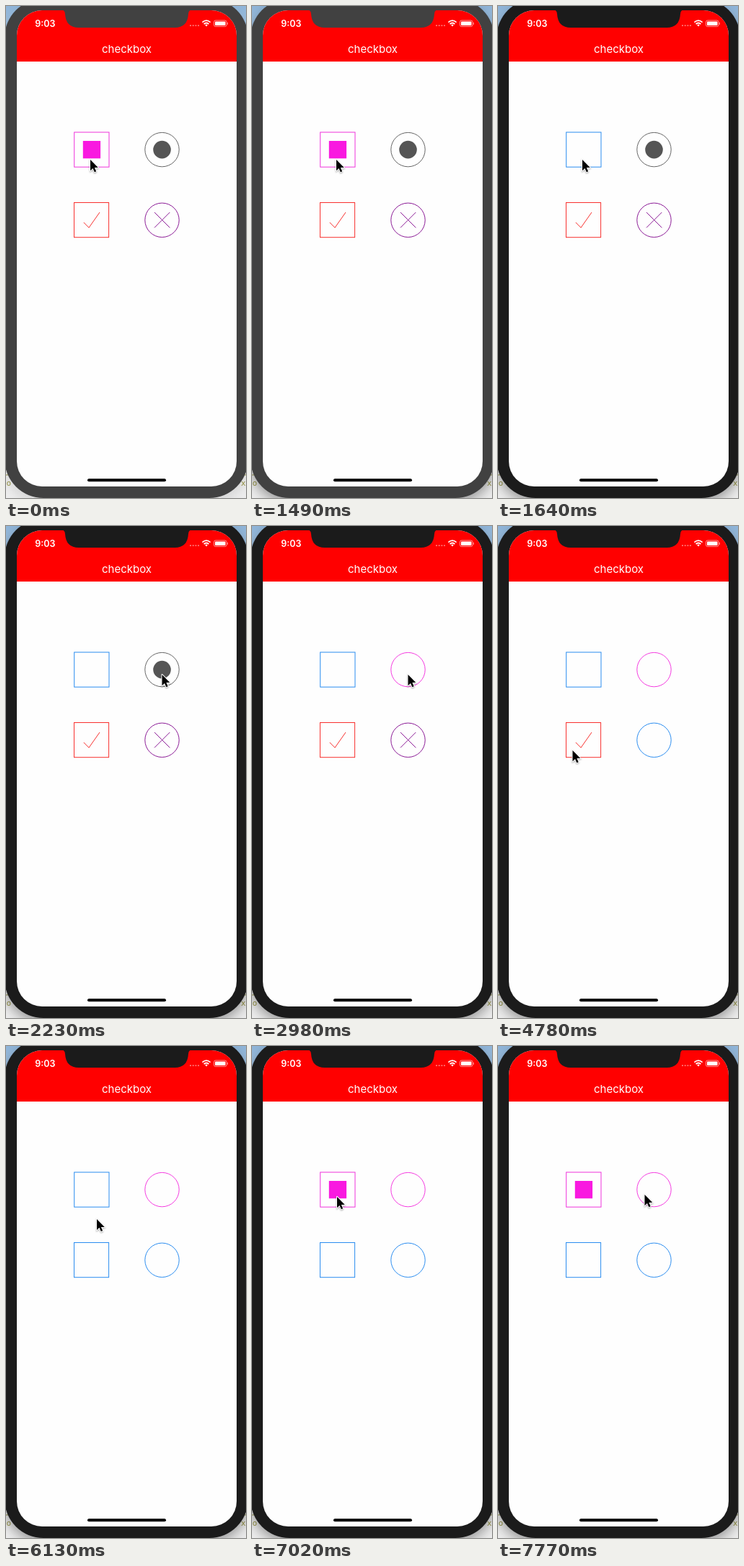
An HTML page for the animation above (8 s loop, 333x682 px).

```html
<!DOCTYPE html>
<html lang="en">
<head>
<meta charset="utf-8">
<title>checkbox</title>
<style>
  html, body { margin: 0; height: 100%; overflow: hidden; }
  svg { display: block; width: 333px; height: 682px; }
  text { font-family: Inter, sans-serif; fill: #fff; }
  .code { font: 11px "DejaVu Sans Mono", monospace; fill: #989643; }
  .line { fill: none; stroke-width: 1; }
</style>
</head>
<body>
<svg viewBox="0 0 333 682">
  <defs>
    <linearGradient id="desk" x2="0" y2="1">
      <stop offset="0" stop-color="#8fb5d9"/>
      <stop offset=".15" stop-color="#c3d6e8"/>
      <stop offset=".5" stop-color="#eee"/>
      <stop offset="1" stop-color="#eee"/>
    </linearGradient>
    <filter id="blur" x="-20%" y="-20%" width="140%" height="140%"><feGaussianBlur stdDeviation="9"/></filter>
    <filter id="soft" x="-50%" y="-50%" width="200%" height="200%"><feGaussianBlur stdDeviation=".8"/></filter>
    <clipPath id="screen"><rect x="15" y="6" width="305" height="660" rx="35"/></clipPath>
    <path id="arrow" d="M0 0V15.2L3.5 11.9L5.8 17.2L8.2 16.2L5.9 11H10.8Z"/>
  </defs>

  <rect width="333" height="682" fill="url(#desk)"/>
  <g class="code">
    <text class="code" x="-6" y="665">po</text>
    <text class="code" x="326" y="665">x</text>
    <path d="M0 650h3M330 650h3" stroke="#989643"/>
  </g>
  <rect id="shadow" x="-2" y="0" width="338" height="688" rx="54" filter="url(#blur)"/>
  <rect class="bezel" x="-2" y="-10" width="338" height="692" rx="54"/>

  <g clip-path="url(#screen)">
    <path d="M15 6h305v660H15z" fill="#fefefe"/>
    <path d="M15 6h305v71H15z" fill="#f00"/>
    <path class="bezel" d="M77 5Q82 6 82 11Q83 30 101 30H234Q252 30 253 11Q253 6 258 5Z"/>
  </g>
  <text x="54.3" y="28.5" font-size="12.5" font-weight="600" text-anchor="middle">9:03</text>
  <text x="167.5" y="65" font-size="15" text-anchor="middle">checkbox</text>
  <path d="M255 27.2h13" stroke="#fff" stroke-opacity=".45" stroke-width="1.8" stroke-dasharray="2 1.7"/>
  <g fill="none" stroke="#fff" stroke-width="1.7">
    <path d="M272.4 22.6Q278 17.6 283.6 22.6M274.6 25Q278 22 281.4 25"/>
    <path d="M276.2 26.3Q278 24.9 279.8 26.3L278 28.6Z" fill="#fff" stroke="none"/>
  </g>
  <rect x="288.5" y="20" width="17.5" height="8.5" rx="2.3" fill="none" stroke="#fff" stroke-opacity=".55"/>
  <rect x="290" y="21.5" width="14.5" height="5.5" rx="1" fill="#fff"/>
  <path d="M307.4 22.8v3" stroke="#fff" stroke-opacity=".6"/>
  <rect x="113" y="655.3" width="109" height="4" rx="2"/>

  <g class="line">
    <rect id="box1" x="94.7" y="175" width="48.3" height="48.2"/>
    <circle id="ring1" cx="216.5" cy="199.1" r="23.7"/>
    <rect id="box2" x="94.5" y="272.5" width="48.1" height="48.2"/>
    <circle id="ring2" cx="216.5" cy="296.8" r="23.7"/>
    <path id="tick" d="M107.8 300L115 307.3L130 286" stroke="#f8312f"/>
    <path id="cross" d="M206 286L227.3 307.3M227.3 286L206 307.3" stroke="#8b1a96"/>
  </g>
  <rect id="fill1" x="106.8" y="187" width="24.3" height="24.3" fill="#f919e0"/>
  <circle id="dot" cx="216.5" cy="199.1" r="12.3" fill="#555"/>

  <g id="cursor">
    <use href="#arrow" y="1.2" opacity=".35" stroke="#000" stroke-width="1.5" filter="url(#soft)"/>
    <use href="#arrow" stroke="#fff" stroke-width="2" stroke-linejoin="round"/>
    <use href="#arrow"/>
  </g>
</svg>
<script>
const LOOP = 8000, STEP = 148, BLUE = '#2b8df0';
const get = id => document.getElementById(id);
const bezels = document.querySelectorAll('.bezel');

// start time, steps, then the start, control and end points of a curve
const moves = [
  [1786, 4, 117, 213, 166, 206, 216.5, 206],
  [3130, 4, 216.5, 206, 213, 250, 213, 296],
  [4330, 4, 213, 296, 165, 358, 103.5, 311],
  [5830, 5, 103.5, 311, 139.5, 249, 118, 209],
  [7170, 5, 118, 209, 160, 205, 203.5, 206]
];

function cursorAt(t) {
  const [start, steps, x0, y0, cx, cy, x1, y1] = moves.findLast(m => t >= m[0]) || moves[0];
  const done = Math.floor((t - start) / STEP) + 1;
  const p = Math.min(1, Math.max(0, done / steps));
  const u = p * p * (3 - 2 * p), v = 1 - u;
  const curve = (a, b, c) => v * v * a + 2 * u * v * b + u * u * c;
  return [curve(x0, cx, x1), curve(y0, cy, y1)];
}

function toggle(outline, mark, on, onColor, offColor) {
  get(outline).setAttribute('stroke', on ? onColor : offColor);
  get(mark).style.display = on ? '' : 'none';
}

function draw() {
  const t = performance.now() % LOOP;
  bezels.forEach(b => b.setAttribute('fill', t < 1640 ? '#414141' : '#1b1b1b'));
  get('shadow').setAttribute('opacity', t < 1490 ? .12 : .38);
  toggle('box1', 'fill1', t < 1640 || t >= 7020, '#ef35dc', BLUE);
  toggle('ring1', 'dot', t < 2980, '#666', '#f53be0');
  toggle('ring2', 'cross', t < 4180, '#8b1a96', BLUE);
  toggle('box2', 'tick', t < 5530, '#f8312f', BLUE);
  get('cursor').setAttribute('transform', `translate(${cursorAt(t)})`);
  requestAnimationFrame(draw);
}
draw();
</script>
</body>
</html>
```
